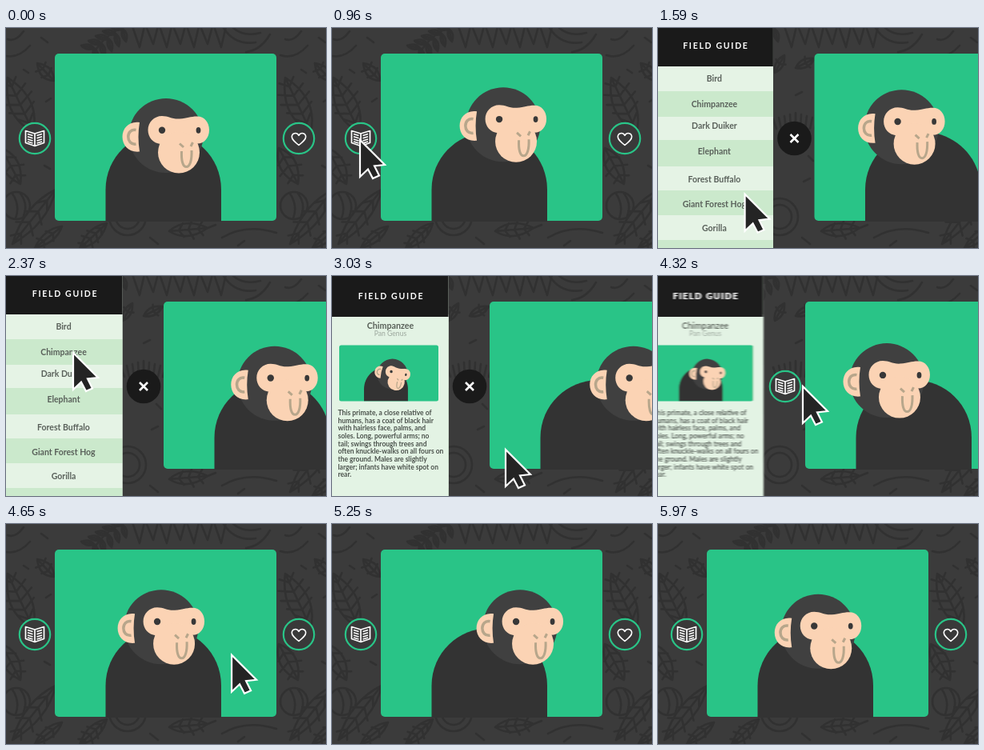
An HTML page for the animation above (6 s loop, 400 by 275 pixels).

```html
<!DOCTYPE html>
<html lang="en">
<head>
<meta charset="utf-8">
<title>Field guide</title>
<style>
  html, body { margin: 0; width: 100%; height: 100%; overflow: hidden; background: #3b3b3b; }
  svg { display: block; width: 400px; height: 275px; }
  text { font-family: Lato, "Open Sans", sans-serif; font-weight: 700; }
  .mid { text-anchor: middle; }
  .heading { font-size: 10.5px; letter-spacing: 1.7px; fill: #fff; }
  .row { font-size: 10.5px; fill: #59605a; }
  .copy { font-size: 8.5px; fill: #4b524c; }
  .doodle { fill: none; stroke: #313131; stroke-width: 2.6; stroke-linecap: round; stroke-linejoin: round; }
</style>
</head>
<body>
<svg viewBox="0 0 400 275">
  <defs>
    <path id="body" fill="#333" d="M124.500 242V202C124.500 161 158 130 197 130S269 161 269 202V242Z"/>
    <g id="head">
      <circle cx="200" cy="134.500" r="46.500" fill="#404040"/>
      <path fill="#fbd3b4" d="M167 118C154 116 145.500 125 145.500 136S154 156 167 154.500Q164 136 167 118Z"/>
      <path fill="none" stroke="#b7a68b" stroke-width="3.500" d="M162.500 127.500C149.500 125 149.500 147 162.500 145"/>
      <g fill="#fbd3b4">
        <path d="M195 110C203 110 207 114 217 113.500S230 110.500 239 110.500C248 110.500 254 118 254 127.500S248 144.500 239 144.500L236 147H196L193 145C184 144 177.500 137 177.500 127.500S185 110 195 110Z"/>
        <circle cx="216" cy="155.500" r="26"/>
      </g>
      <circle cx="195" cy="127.800" r="4.200" fill="#383838"/>
      <ellipse cx="240.500" cy="127.800" rx="2.900" ry="3.900" fill="#383838"/>
      <path fill="none" stroke="#b7a68b" stroke-width="3" d="M217 144.500L222 149M233.500 143L231 148M219.500 154C219 166 221 173.500 225.500 173.500S232.500 165 232 153"/>
    </g>
    <clipPath id="photo"><rect x="9" y="86.500" width="124" height="70" rx="2.500"/></clipPath>
    <filter id="smear" x="-5%" y="-5%" width="110%" height="110%">
      <feGaussianBlur id="blur" stdDeviation="0 0"/>
    </filter>
  </defs>

  <rect width="400" height="275" fill="#3b3b3b"/>
  <g id="doodles" class="doodle"></g>

  <g id="scene">
    <rect x="61" y="32" width="277" height="209" rx="5" fill="#29c487"/>
    <use href="#body"/>
    <use id="mover" href="#head"/>

    <g id="openButton">
      <circle cx="36" cy="138" r="19.200" fill="#393939" stroke="#29c487" stroke-width="2.200"/>
      <g fill="none" stroke="#fff">
        <path stroke-width="1.700" stroke-linejoin="round" d="M36 132L24.500 128.500V143.500L36 147.500L47.500 143.500V128.500ZM36 132V147.500"/>
        <path stroke-width="1.500" d="M27 132.500L33.500 134.500M27 135.800L33.500 137.800M27 139L33.500 141M27 142L33.500 144M45 132.500L38.500 134.500M45 135.800L38.500 137.800M45 139L38.500 141M45 142L38.500 144"/>
      </g>
    </g>
    <g id="closeButton">
      <circle cx="36" cy="138" r="21.300" fill="#1a1a1a"/>
      <path stroke="#fff" stroke-width="2.600" d="M31 133L41 143M41 133L31 143"/>
    </g>

    <circle cx="366" cy="138" r="19.200" fill="#393939" stroke="#29c487" stroke-width="2.200"/>
    <path fill="none" stroke="#fff" stroke-width="1.600" stroke-linejoin="round" d="M366 146.500C361 142.500 357.300 139.500 357.300 136C357.300 131 363.500 130 366 134.300C368.500 130 374.700 131 374.700 136C374.700 139.500 371 142.500 366 146.500Z"/>
  </g>

  <g id="panel">
    <g filter="url(#smear)">
      <rect width="145.500" height="275" fill="#e3f3e4"/>
      <g id="list"></g>
      <g id="detail">
        <rect width="145.500" height="275" fill="#e3f3e4"/>
        <rect width="145.500" height="51" fill="#1a1a1a"/>
        <text class="mid heading" x="74" y="28.800">FIELD GUIDE</text>
        <text class="mid" x="73" y="65.500" font-size="10.700" fill="#596059">Chimpanzee</text>
        <text class="mid" x="73" y="75.300" style="font-weight:400" font-size="8.600" fill="#9ba69c">Pan Genus</text>
        <g clip-path="url(#photo)">
          <rect x="9" y="86" width="124" height="71" fill="#29c487"/>
          <use href="#body" transform="translate(-7.300 64.500) scale(.38)"/>
          <use id="miniHead" href="#head"/>
        </g>
      </g>
    </g>
  </g>

  <path id="cursor" fill="#242424" stroke="#fff" stroke-width="2.200" d="M0 0V46L10 36.500L16 48L24 44.500L18 32.500L31 31Z"/>
</svg>
<script>
const $ = id => document.getElementById(id);
const LOOP = 6000, PANEL = 145.5, SHIFT = 136;
const clamp = v => Math.min(1, Math.max(0, v));
const easeInOut = p => p < .5 ? 4 * p ** 3 : 1 - 4 * (1 - p) ** 3;
const ramp = (t, start, length) => easeInOut(clamp((t - start) / length));

function add(parent, tag, attrs, content = '') {
  const el = document.createElementNS('http://www.w3.org/2000/svg', tag);
  for (const key in attrs) el.setAttribute(key, attrs[key]);
  el.textContent = content;
  parent.append(el);
  return el;
}

// Leaf from base to tip with a midrib and paired veins
function leaf(x1, y1, x2, y2, width, veins) {
  const dx = x2 - x1, dy = y2 - y1, len = Math.hypot(dx, dy);
  const at = (along, side) =>
    `${(x1 + dx * along - dy / len * side).toFixed(1)} ${(y1 + dy * along + dx / len * side).toFixed(1)}`;
  let d = `M${x1} ${y1}Q${at(.45, width)} ${x2} ${y2}Q${at(.45, -width)} ${x1} ${y1}L${x2} ${y2}`;
  for (let i = 1; i <= veins; i++) {
    const a = i / (veins + 1), reach = width * .75 * Math.sin(Math.PI * a);
    d += `M${at(a + .12, reach)}L${at(a, 0)}L${at(a + .12, -reach)}`;
  }
  return d;
}
const ring = (x, y, r) => `M${x - r} ${y}a${r} ${r} 0 1 0 ${2 * r} 0a${r} ${r} 0 1 0 ${-2 * r} 0`;

function drawDoodles() {
  const edge = leaf(34, 130, 2, 62, 26, 5) + leaf(60, 66, 39, 44, 13, 2)
    + leaf(-6, 150, 18, 195, 20, 3) + ring(13, 222, 17) + 'M8 207Q18 222 12 238M18 207Q28 220 22 235'
    + leaf(62, 202, 8, 270, 19, 4) + leaf(70, 248, 36, 275, 12, 2)
    + 'M-4 34Q14 40 30 22M2 14Q12 18 22 4M44 12L52 18M22 52L28 56M50 92L56 88M48 172L55 176';
  for (const x of [0, 347]) add($('doodles'), 'path', { d: edge, transform: `translate(${x} 0)` });

  let d = 'M152 -4Q122 8 108 34';
  for (let i = 0; i < 5; i++) {
    const x = 146 - i * 9, y = 1 + i * 6;
    d += leaf(x, y, x - 16, y - 3, 6, 0) + leaf(x, y, x + 4, y + 16, 6, 0);
  }
  for (let i = 0; i < 7; i++) {
    const x = 158 + i * 17;
    d += `M${x} -2L${x + 9} ${24 - i % 2 * 4}L${x + 15} -2`;
  }
  for (let i = 0; i < 9; i++) {
    const x = 148 + i * 6;
    d += `M${x} 126L${x - 4 + i} ${106 + Math.abs(i - 4) * 2}`;
  }
  d += leaf(172, 50, 196, 38, 10, 1) + leaf(146, 56, 158, 34, 9, 1)
    + ring(152, 236, 23) + ring(152, 236, 15) + 'M188 160L194 166M182 192L190 188M172 84L180 80'
    + leaf(204, 254, 252, 250, 16, 3) + 'M252 250L262 246'
    + leaf(126, 244, 92, 276, 14, 4)
    + 'M272 0Q286 22 312 18M282 -2Q296 12 318 6M300 30Q318 28 330 8M270 262Q300 244 338 256M180 262L190 270M290 272L298 266';
  add($('doodles'), 'path', { d });
}

function drawList() {
  const list = $('list');
  const names = ['Bird', 'Chimpanzee', 'Dark Duiker', 'Elephant', 'Forest Buffalo', 'Giant Forest Hog', 'Gorilla', ''];
  const tops = [48, 79, 111, 140, 173, 203, 234, 265, 296];
  const mids = [63, 95, 122, 154, 189, 220, 250, 281];
  add(list, 'rect', { width: PANEL, height: 48, fill: '#1a1a1a' });
  add(list, 'text', { class: 'mid heading', x: 74, y: 25.8 }, 'FIELD GUIDE');
  names.forEach((name, i) => {
    add(list, 'rect', { y: tops[i], width: PANEL, height: tops[i + 1] - tops[i], fill: i % 2 ? '#cbe9cc' : '#e5f3e5' });
    add(list, 'text', { class: 'mid row', x: 72, y: mids[i] + 3.6 }, name);
  });
}

function drawCopy() {
  ['This primate, a close relative of', 'humans, has a coat of black hair', 'with hairless face, palms, and',
    'soles. Long, powerful arms; no', 'tail; swings through trees and', 'often knuckle-walks on all fours on',
    'the ground. Males are slightly', 'larger; infants have white spot on', 'rear.']
    .forEach((line, i) => add($('detail'), 'text', { class: 'copy', x: 7.5, y: 174 + i * 9.65 }, line));
}

// time, x, y of the pointer tip
const pointer = [
  [630, 405, 195], [930, 35, 140], [1290, 35, 140], [1620, 110, 209], [1740, 110, 209], [2070, 84, 96],
  [2400, 84, 96], [2790, 217, 217], [3480, 217, 217], [3930, 181, 138], [4440, 181, 138], [4890, 405, 195]
];
function pointerAt(t) {
  let i = 0;
  while (i < pointer.length - 2 && t >= pointer[i + 1][0]) i++;
  const [t0, x0, y0] = pointer[i], [t1, x1, y1] = pointer[i + 1];
  const k = (1 - Math.cos(Math.PI * clamp((t - t0) / (t1 - t0)))) / 2;
  return [x0 + (x1 - x0) * k, y0 + (y1 - y0) * k];
}

// The head sways right, then left, lifting in the middle of each move
function sway(t) {
  const c = Math.cos(Math.PI * t / 600);
  const side = Math.floor(t / 1200) % 2 ? -1 : 1;
  return [side * 20.5 * (1 - c), -20 * (1 - Math.abs(c))];
}

const openness = t => ramp(t, 1230, 420) - ramp(t, 4200, 420);
const place = (id, value) => $(id).setAttribute('transform', value);
const show = (id, on) => $(id).setAttribute('visibility', on ? 'visible' : 'hidden');

function render(t) {
  const open = openness(t);
  const speed = Math.abs(openness(t + 5) - openness(t - 5)) * PANEL / 10;
  const [hx, hy] = sway(t);
  place('mover', `translate(${hx} ${hy})`);
  place('scene', `translate(${SHIFT * open} 0)`);
  place('panel', `translate(${PANEL * (open - 1)} 0)`);
  show('panel', open > 0);
  $('blur').setAttribute('stdDeviation', `${(3.5 * speed).toFixed(2)} 0`);

  const closing = t >= 1230 && t < 4200;
  show('closeButton', closing);
  show('openButton', !closing);

  $('detail').setAttribute('opacity', ramp(t, 2430, 210));
  place('miniHead', `translate(-6.5 67.5) scale(.41) rotate(${8 + hx * .1} 200 134.5)`);

  const [px, py] = pointerAt(t);
  place('cursor', `translate(${px} ${py})`);
  show('cursor', t > 630 && t < 4890);
}

drawDoodles();
drawList();
drawCopy();

const start = performance.now();
function tick() {
  render((performance.now() - start) % LOOP);
  requestAnimationFrame(tick);
}
tick();
</script>
</body>
</html>
```
